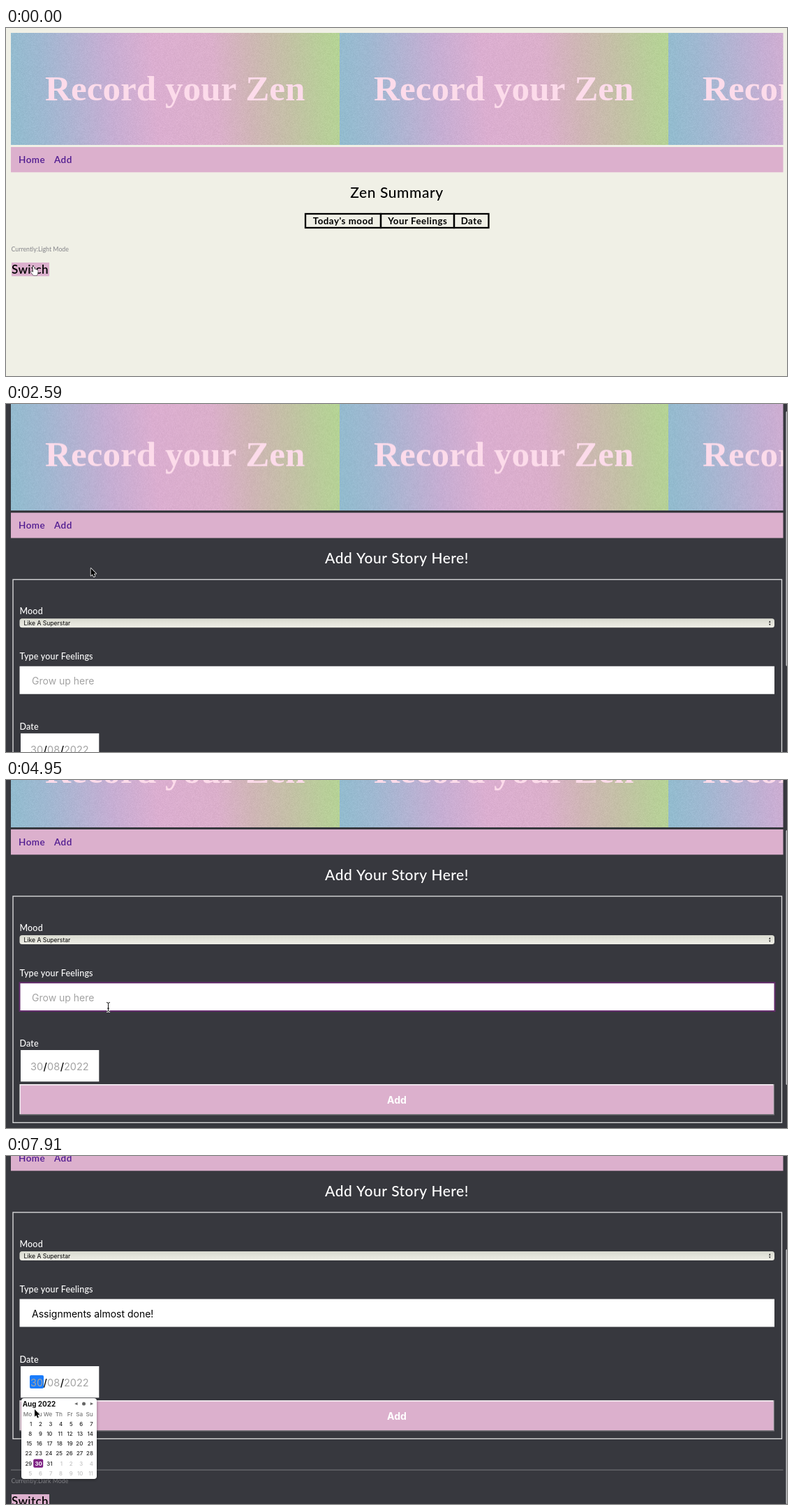
Write an HTML page with a canvas that moves like this. It is 1119x500 px and loops after 8000 ms.

```html
<!DOCTYPE html>
<html lang="en">
<head>
<meta charset="utf-8">
<title>Mood journal</title>
<style>
  html, body { margin: 0; width: 100%; height: 100%; overflow: hidden; }
  canvas { display: block; }
</style>
</head>
<body>
<canvas id="stage" width="1119" height="500"></canvas>
<script>
const ctx = document.getElementById('stage').getContext('2d');
const LOOP = 8000;
const PINK = '#dcb0cd', PURPLE = '#4f1a90', GREY = '#a3a3a3';
const ui = (weight, size) => `${weight} ${size}px Lato, sans-serif`;
const sys = (weight, size) => `${weight} ${size}px Inter, sans-serif`;

// The screen refreshes in bursts: [first, last, count]
const ticks = [
  [0, 0, 1], [150, 150, 1], [450, 1350, 7], [1500, 1800, 3], [2150, 2300, 2],
  [2590, 3620, 8], [3910, 4360, 4], [4800, 4950, 2], [5540, 5690, 2],
  [6130, 7160, 8], [7460, 7460, 1], [7760, 7910, 2]
].flatMap(([first, last, n]) => Array.from({ length: n }, (_, i) =>
  Math.floor((first + (last - first) * i / (n - 1 || 1)) / 10) * 10));

// [time, x, y]
const pointerPath = [
  [0, 40, 349], [300, 40, 349], [450, 110, 338], [750, 455, 268], [900, 465, 256],
  [1200, 180, 210], [1350, 88, 190], [1800, 89, 186], [2300, 89, 186],
  [3030, 171, 312], [3620, 135, 242], [3910, 130, 235], [4360, 148, 333],
  [4800, 148, 326], [6130, 135, 327], [6270, 122, 328], [6570, 115, 328],
  [7160, 40, 331], [7460, 40, 331], [7910, 41, 364]
];
// [time, offset]
const scrollPath = [
  [0, 0], [2440, 0], [3030, 58], [3470, 100], [6270, 100], [6570, 172], [7010, 186]
];

function along(path, t) {
  const next = path.findIndex(key => key[0] > t);
  if (next < 0) return path[path.length - 1].slice(1);
  const a = path[next - 1], b = path[next];
  const f = (t - a[0]) / (b[0] - a[0]);
  return a.slice(1).map((v, i) => v + (b[i + 1] - v) * f);
}

function text(str, x, y, font, color, spacing = 0, align = 'left', c = ctx) {
  c.font = font;
  c.fillStyle = color;
  c.letterSpacing = spacing + 'px';
  c.textAlign = align;
  c.fillText(str, x, y);
}

function rect(x, y, w, h, color) {
  ctx.fillStyle = color;
  ctx.fillRect(x, y, w, h);
}

function rounded(x, y, w, h, r, color) {
  ctx.fillStyle = color;
  ctx.beginPath();
  ctx.roundRect(x, y, w, h, r);
  ctx.fill();
}

function outline(x, y, w, h, width, color) {
  ctx.lineWidth = width;
  ctx.strokeStyle = color;
  ctx.strokeRect(x, y, w, h);
}

function triangle(x, y, dx, dy, color) {
  ctx.fillStyle = color;
  ctx.beginPath();
  ctx.moveTo(x + dx, y + dy);
  ctx.lineTo(x - dx + dy * .9, y - dy + dx * .9);
  ctx.lineTo(x - dx - dy * .9, y - dy - dx * .9);
  ctx.fill();
}

function makeBannerTile() {
  const tile = document.createElement('canvas');
  tile.width = 471;
  tile.height = 161;
  const c = tile.getContext('2d');
  const g = c.createLinearGradient(0, 98, 471, 63);
  [[0, '#93bccf'], [.1, '#9fb8d1'], [.3, '#c6aed3'], [.44, '#dbaed0'], [.62, '#dbafcb'],
   [.72, '#d0b5b7'], [.84, '#c4c0a6'], [.94, '#b9cd9a'], [1, '#b5d395']]
    .forEach(([stop, color]) => g.addColorStop(stop, color));
  c.fillStyle = g;
  c.fillRect(0, 0, 471, 161);

  // paper grain
  const image = c.getImageData(0, 0, 471, 161), px = image.data;
  let seed = 7;
  for (let i = 0; i < px.length; i += 4) {
    seed = (Math.imul(seed, 1664525) + 1013904223) >>> 0;
    const d = (seed / 2 ** 32 - .5) * 11;
    for (let k = 0; k < 3; k++) px[i + k] += d;
  }
  c.putImageData(image, 0, 0);
  text('Record your Zen', 49, 97, 'bold 51.2px "Liberation Serif", serif', '#fcdbea', 0, 'left', c);
  return tile;
}
const bannerTile = makeBannerTile();

function header(addHover) {
  ctx.save();
  ctx.beginPath();
  ctx.rect(7, 7, 1106.5, 161);
  ctx.clip();
  for (let i = 0; i < 3; i++) ctx.drawImage(bannerTile, 7 + 471 * i, 7);
  ctx.restore();
  rect(7, 171, 1106.5, 36.3, PINK);
  text('Home', 18, 194, ui(600, 13.5), PURPLE, .5);
  text('Add', 69, 194, ui(600, 13.5), addHover ? '#ff0a1e' : PURPLE, .5);
}

function modeSwitch(top, mode) {
  text(`Currently:${mode} Mode`, 7.5, top + 321, ui(400, 8.8), '#85858a');
  rect(8, top + 337, 54, 19.5, PINK);
  text('Switch', 8, top + 353, ui(600, 17), '#000', .4);
}

function summaryPage(ink, mode) {
  text('Zen Summary', 560, 244, ui(500, 21), ink, .6, 'center');
  [['Today\'s mood', 429, 537], ['Your Feelings', 537, 642], ['Date', 642, 691.5]]
    .forEach(([label, left, right]) => {
      outline(left, 267, right - left, 20, 2.3, '#000');
      text(label, (left + right) / 2 + .2, 281.5, ui(700, 13.3), ink, .5, 'center');
    });
  modeSwitch(0, mode);
}

function formPage({ focused, typed, picking }) {
  text('Add Your Story Here!', 560, 244, ui(500, 21), '#fff', .5, 'center');
  outline(10, 267, 1101.5, 325.3, 1.4, '#d6d6d8');

  text('Mood', 19.5, 317, ui(500, 12.5), '#fff', .15);
  const shade = ctx.createLinearGradient(0, 323, 0, 336);
  shade.addColorStop(0, '#d9dad0');
  shade.addColorStop(1, '#eeeee6');
  rounded(19.5, 323, 1081.5, 13, 3.5, shade);
  text('Like A Superstar', 25.5, 332.7, sys(400, 8.6), '#000');
  triangle(1094.3, 327.4, 0, -1.3, '#111');
  triangle(1094.3, 331.8, 0, 1.3, '#111');

  text('Type your Feelings', 19.5, 382, ui(500, 12.5), '#fff', .15);
  rect(19.5, 391.5, 1081.5, 40, '#fff');
  if (focused) outline(19.5, 391.2, 1082, 40.8, 2, '#632c6c');
  if (typed) text('Assignments almost done!', 37, 417.5, sys(400, 14), '#000');
  else text('Grow up here', 37, 417.5, sys(400, 14), GREY);

  text('Date', 19.5, 483, ui(500, 12.5), '#fff', .15);
  rect(21, 488, 112.3, 45.3, '#fff');
  if (picking) rounded(34, 501, 20, 19, 2, '#1a7cfb');
  [['30', 35], ['08', 59], ['2022', 83]].forEach(([part, x]) =>
    text(part, x, 517, sys(400, 14.5), GREY));
  [53.5, 77.7].forEach(x => text('/', x, 517, sys(500, 14.5), '#000'));

  rect(19.5, 537, 1081.5, 44.5, '#77757a');
  rect(19.5, 537, 1080, 43, '#f4edf2');
  rect(21, 538.7, 1078.5, 41.3, PINK);
  text('Add', 560, 565, sys(700, 14), '#fff', 0, 'center');

  rect(7, 636.5, 1106.5, 1.2, '#707074');
  modeSwitch(335, 'Dark');
  if (picking) calendar(22, 534);
}

function calendar(x, y) {
  ctx.save();
  ctx.shadowColor = 'rgba(0,0,0,.4)';
  ctx.shadowBlur = 4;
  ctx.shadowOffsetY = 1;
  rounded(x, y, 108, 116, 4, '#fff');
  ctx.restore();
  text('Aug 2022', x + 1.7, y + 11.5, sys(700, 9.9), '#111');
  triangle(x + 78.3, y + 8, -2.2, 0, '#666');
  rounded(x + 87, y + 5.5, 5, 5, 2.5, '#666');
  triangle(x + 101, y + 8, 2.2, 0, '#666');

  const columnEnd = i => x + 15.2 + 14.6 * i;
  'Mo Tu We Th Fr Sa Su'.split(' ').forEach((day, i) =>
    text(day, columnEnd(i), y + 26, sys(500, 8.2), '#777', 0, 'right'));
  for (let i = 0; i < 42; i++) {
    const right = columnEnd(i % 7), base = y + 40 + 14.15 * Math.floor(i / 7);
    const today = i === 29;
    if (today) rounded(right - 12.6, base - 9.2, 14, 12.4, 2, '#7d2182');
    text(i % 31 + 1, right, base, sys(today ? 700 : 500, 7.8),
      today ? '#fff' : i < 31 ? '#222' : '#c2c2c2', 0, 'right');
  }
}

const arrow = new Path2D('M0 0V10.6L2.4 8.4 4 12.2 5.9 11.4 4.3 7.7H7.6Z');
const beam = new Path2D('M-2.5-6.5Q0-6.5 0-5Q0-6.5 2.5-6.5M0-5V5M-1.5 2H1.5M-2.5 6.5Q0 6.5 0 5Q0 6.5 2.5 6.5');
const hand = new Path2D('M-1.6-6Q-.4-7.2.4-5.6L1-2.2Q2.2-3.2 2.8-1.8 4-2.4 4.4-1.2 5.8-1.6 5.8.4L5.4 3.4 4.4 6.6H-.8L-4.4 1.6Q-4.6.2-3.2.5L-1.2 2Z');

function pointer(kind, x, y) {
  ctx.save();
  ctx.translate(x, y);
  ctx.lineJoin = 'round';
  if (kind === 'beam') {
    ctx.lineWidth = 2.6;
    ctx.strokeStyle = '#fff';
    ctx.stroke(beam);
    ctx.lineWidth = 1;
    ctx.strokeStyle = '#111';
    ctx.stroke(beam);
  } else {
    const isHand = kind === 'hand';
    ctx.lineWidth = isHand ? 1 : 1.5;
    ctx.strokeStyle = isHand ? '#111' : '#fff';
    ctx.fillStyle = isHand ? '#fff' : '#000';
    ctx.stroke(isHand ? hand : arrow);
    ctx.fill(isHand ? hand : arrow);
  }
  ctx.restore();
}

function draw(time) {
  const t = ticks.findLast(tick => tick <= time);
  const [x, y] = along(pointerPath, t);
  const [scroll] = along(scrollPath, t);
  const dark = t >= 150, onForm = t >= 2150;

  rect(0, 0, 1119, 500, dark ? '#37383e' : '#f0f0e6');
  ctx.save();
  ctx.translate(0, -scroll);
  header(t >= 1500 && !onForm);
  if (onForm) {
    formPage({ focused: t >= 4800 && t < 7460, typed: t >= 5540, picking: t >= 7460 });
  } else {
    summaryPage(dark ? '#fff' : '#000', dark ? 'Dark' : 'Light');
  }
  ctx.restore();

  const barVisible = (t >= 2590 && t < 5690) || t >= 6400;
  if (barVisible) rounded(1117.5, scroll * .72, 3, 366, 1.5, '#c4c4c6');

  const overInput = onForm && y + scroll > 392 && y + scroll < 431;
  const hiddenByTyping = t >= 5540 && t < 6130;
  if (!hiddenByTyping) pointer(t < 450 ? 'hand' : overInput ? 'beam' : 'arrow', x, y);
}

function loop() {
  draw(performance.now() % LOOP);
  requestAnimationFrame(loop);
}
loop();
</script>
</body>
</html>
```
